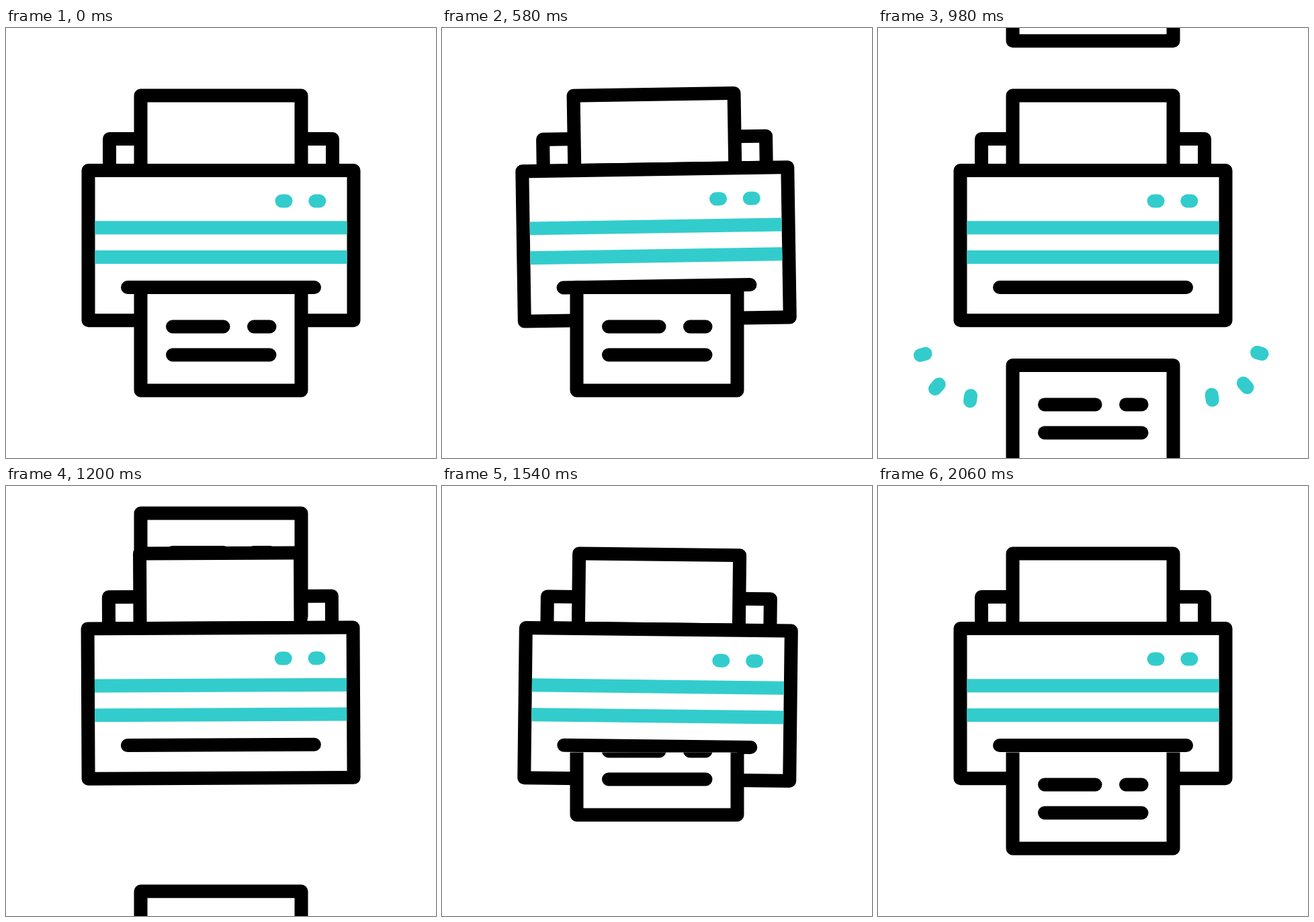
Recreate the animation shown at these times as an HTML page with a canvas. Size 640 px wide and 640 px high, loop 3200 ms.

```html
<!DOCTYPE html>
<html lang="en">
<head>
<meta charset="utf-8">
<title>Printer</title>
<style>
  html, body { margin: 0; width: 100%; height: 100%; overflow: hidden; background: #fff; }
  canvas { display: block; width: 640px; height: 640px; }
</style>
</head>
<body>
<canvas id="stage" width="640" height="640"></canvas>
<script>
const ctx = document.getElementById('stage').getContext('2d');
const LOOP = 3200;
const BLACK = '#000', TEAL = '#33cccc', WHITE = '#fff';
const STROKE = 20;
const PIVOT = [207, 415];
const SLOT_Y = 386, SLOT_EDGE = 396.4;

// Inner end and outer end of each ray
const RAYS = [
  [105, 475, 63, 487], [117, 500, 85, 537], [143, 510.5, 137, 555.3],
  [529.5, 474, 571.5, 485], [517.5, 499.5, 549.5, 535], [491.5, 509, 497.7, 553.8]
];

// Exit of the printed sheet: time, offset, speed
const EXIT = [[600, 0, 0], [800, 33.5, 0.25], [1200, 217, 0.22], [1540, 266, 0]];

function ease(t, from, to) {
  const u = Math.min(1, Math.max(0, (t - from) / (to - from)));
  return u * u * (3 - 2 * u);
}

function hermite(keys, t) {
  if (t <= keys[0][0]) return keys[0][1];
  for (let i = 1; i < keys.length; i++) {
    const [t0, p0, v0] = keys[i - 1], [t1, p1, v1] = keys[i];
    if (t > t1) continue;
    const d = t1 - t0, u = (t - t0) / d, w = 1 - u;
    return p0 + (p1 - p0) * u * u * (3 - 2 * u) + d * u * w * (v0 * w - v1 * u);
  }
  return keys[keys.length - 1][1];
}

// Rocking angle in degrees: five eased swings of 100 ms
function rock(t, start) {
  const poses = [0, -1, 1, -1, 1, 0];
  let angle = 0;
  for (let i = 1; i < poses.length; i++) {
    const at = start + (i - 1) * 100;
    angle += (poses[i] - poses[i - 1]) * ease(t, at, at + 100);
  }
  return angle;
}

function line(x1, y1, x2, y2, color = BLACK, cap = 'round') {
  ctx.strokeStyle = color;
  ctx.lineCap = cap;
  ctx.beginPath();
  ctx.moveTo(x1, y1);
  ctx.lineTo(x2, y2);
  ctx.stroke();
}

function frame(x1, y1, x2, y2) {
  ctx.fillStyle = WHITE;
  ctx.strokeStyle = BLACK;
  ctx.beginPath();
  ctx.rect(x1, y1, x2 - x1, y2 - y1);
  ctx.fill();
  ctx.stroke();
}

function sheet(y) {
  frame(200.5, y, 439.5, y + 153.5);
  line(248, y + 58.5, 323.5, y + 58.5);
  line(369, y + 58.5, 392.5, y + 58.5);
  line(248, y + 100.5, 392.5, y + 100.5);
}

function rocked(angle, draw) {
  ctx.save();
  ctx.translate(...PIVOT);
  ctx.rotate(angle * Math.PI / 180);
  ctx.translate(-PIVOT[0], -PIVOT[1]);
  draw();
  ctx.restore();
}

function tray() {
  frame(154, 165, 486, 212);
}

function body() {
  frame(200.5, 100.5, 439.5, 212);
  frame(122.5, 212, 517.5, 435.3);
  line(132.5, 297.2, 507.5, 297.2, TEAL, 'butt');
  line(132.5, 341, 507.5, 341, TEAL, 'butt');
  line(410.5, 257.5, 416.5, 257.5, TEAL);
  line(460.3, 257.5, 466.3, 257.5, TEAL);
  line(181, SLOT_Y, 459, SLOT_Y);
}

function rays(t, start) {
  const head = ease(t, start, start + 267);
  const tail = ease(t, start + 235, start + 435);
  if (head - tail < 0.001) return;
  for (const [x1, y1, x2, y2] of RAYS) {
    const dx = x2 - x1, dy = y2 - y1;
    line(x1 + dx * tail, y1 + dy * tail, x1 + dx * head, y1 + dy * head, TEAL);
  }
}

function draw(t) {
  ctx.fillStyle = WHITE;
  ctx.fillRect(0, 0, 640, 640);
  ctx.lineWidth = STROKE;
  ctx.lineJoin = 'round';

  const angle = rock(t, 267) + rock(t, 1167);
  const nextY = -178 + 564 * ease(t, 833, 1700);

  rocked(angle, tray);
  if (t > 833 && t < 1700) {
    // Above the slot the new sheet runs behind the printer
    ctx.save();
    ctx.beginPath();
    ctx.rect(0, 0, 640, SLOT_EDGE);
    ctx.clip();
    sheet(nextY);
    ctx.restore();
  }
  rocked(angle, body);

  if (t > 833) {
    ctx.save();
    ctx.beginPath();
    ctx.rect(0, SLOT_EDGE, 640, 640 - SLOT_EDGE);
    ctx.clip();
    sheet(nextY);
    ctx.restore();
  }
  if (t < 1540) sheet(SLOT_Y + hermite(EXIT, t));

  rays(t, 600);
  rays(t, 1615);
}

const begin = performance.now();
function tick() {
  draw((performance.now() - begin) % LOOP);
  requestAnimationFrame(tick);
}
tick();
</script>
</body>
</html>
```
